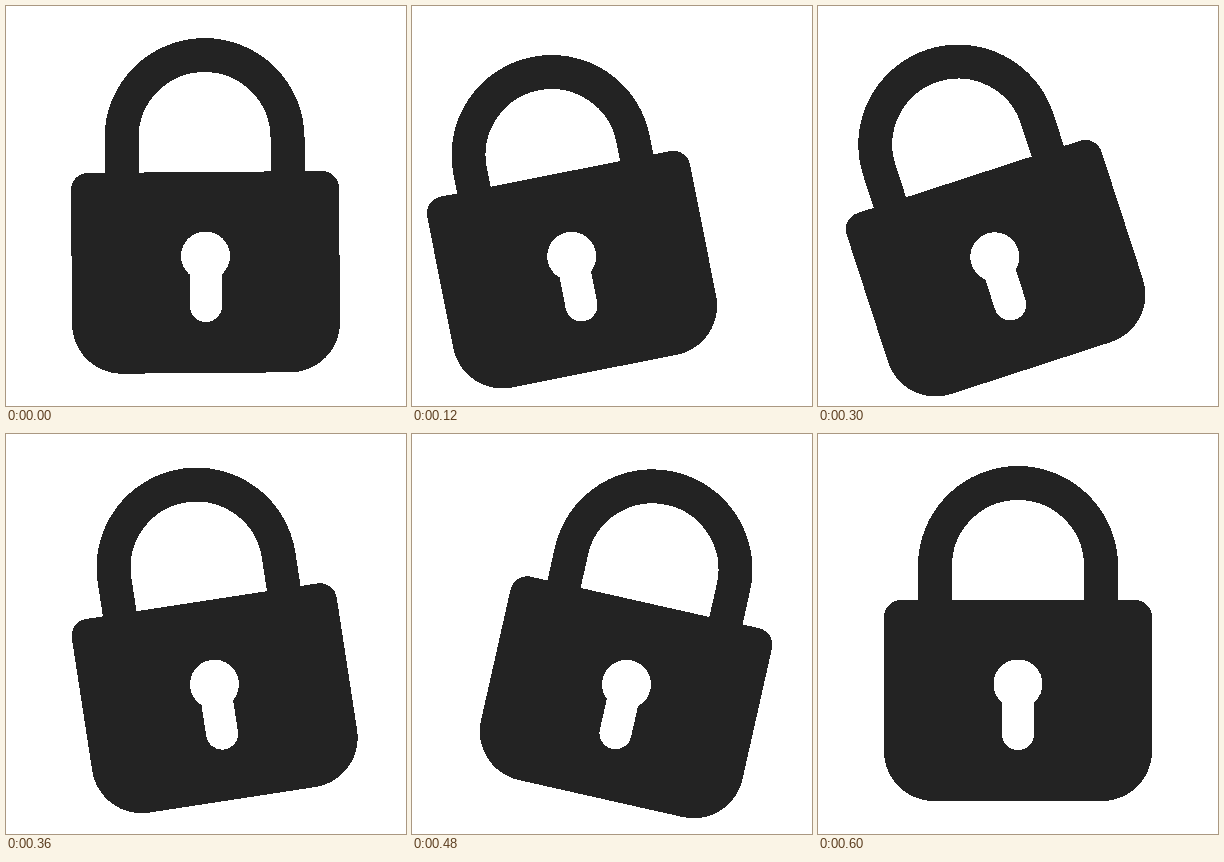
An HTML page that plays this animation: 400 by 400 pixels, repeating every 2.63 s.

```html
<!DOCTYPE html>
<html lang="en">
<head>
<meta charset="utf-8">
<title>Shaking padlock</title>
<style>
  html, body { margin: 0; height: 100%; overflow: hidden; background: #fff; }
  svg { display: block; width: 100%; height: 100%; shape-rendering: crispEdges; }
</style>
</head>
<body>
<svg viewBox="0 0 400 400" fill="#232323">
  <g id="lock">
    <path id="shackle" d="M117 200V132a83 83 0 0 1 166 0V200" fill="none" stroke="#232323" stroke-width="34"/>
    <path d="M83 166H317a17 17 0 0 1 17 17V317a50 50 0 0 1 -50 50H116a50 50 0 0 1 -50 -50V183a17 17 0 0 1 17 -17Z"/>
    <g fill="#fff">
      <circle cx="200" cy="250" r="24.5"/>
      <rect x="184" y="250" width="32" height="66" rx="16"/>
    </g>
  </g>
</svg>
<script>
  const LOOP = 2630, STEP = 30, SHAKE = 600;
  const lock = document.getElementById('lock');
  const shackle = document.getElementById('shackle');

  // Keys are [time in ms, value]
  const shift = [[-9, 0], [165, -44.5], [227, -44.5], [385, 15], [424, 15], [586, 0]];
  const tilt = [[-24, 0], [223, -18], [307, -18], [455, 13.6], [615, 0]];
  const dip = [[-5, 0], [120, 14.7], [250, 0]];

  // Eased value between the neighbouring keys
  function at(keys, t) {
    const i = keys.findIndex(key => key[0] > t);
    if (i < 0) return keys[keys.length - 1][1];
    const [t0, v0] = keys[i - 1], [t1, v1] = keys[i];
    const s = (t - t0) / (t1 - t0);
    return v0 + (v1 - v0) * s * s * (3 - 2 * s);
  }

  function draw(now) {
    const t = Math.floor((now % LOOP) / STEP) * STEP;
    const pose = keys => t < SHAKE ? at(keys, t) : 0;
    // The lock turns about the middle of its body
    lock.setAttribute('transform', `translate(${pose(shift)} 0) rotate(${pose(tilt)} 200 266.5)`);
    shackle.setAttribute('transform', `translate(0 ${pose(dip)})`);
  }

  let start;
  function tick(now) {
    start ??= now;
    draw(now - start);
    requestAnimationFrame(tick);
  }
  draw(0);
  requestAnimationFrame(tick);
</script>
</body>
</html>
```
